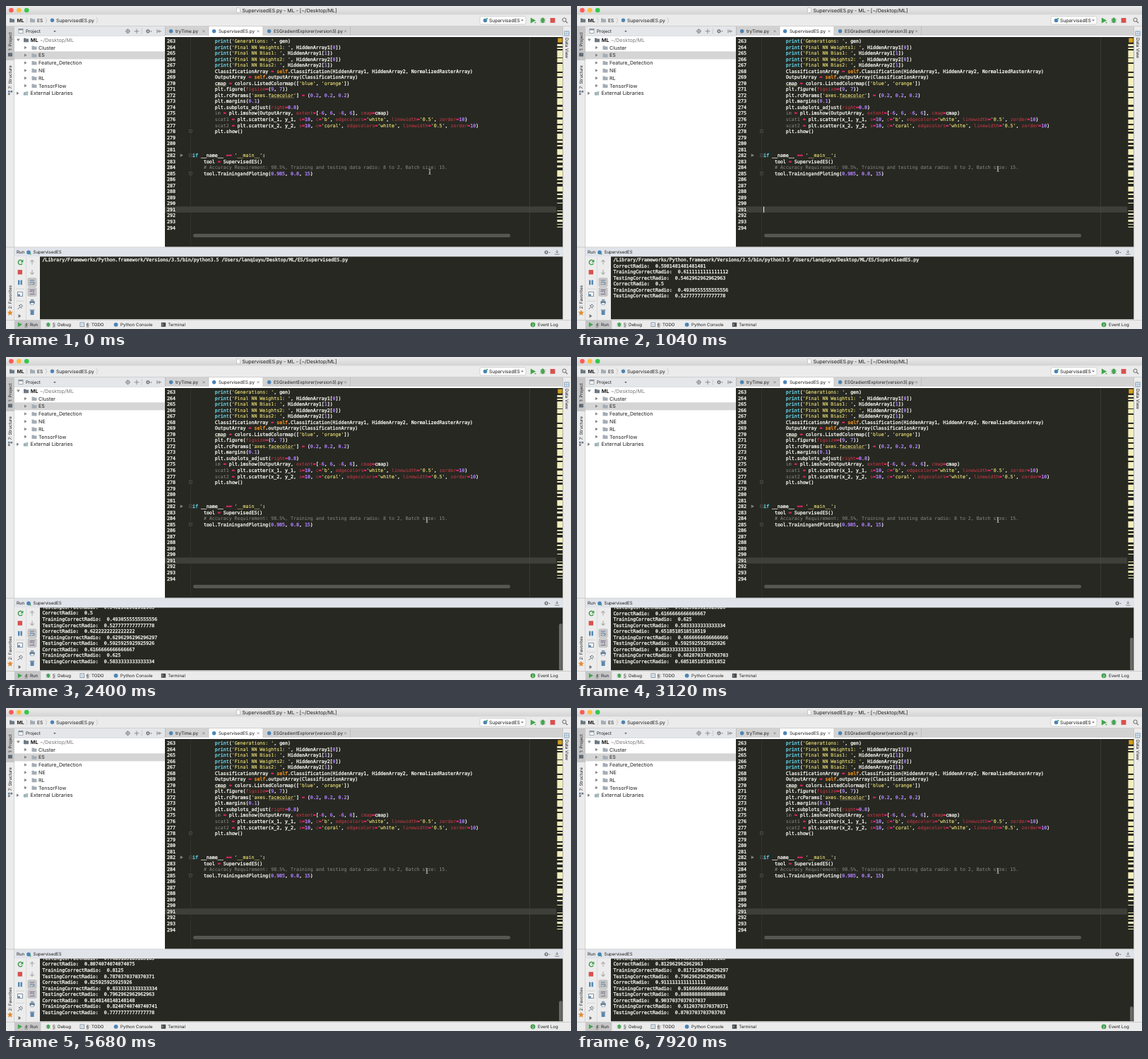
These frames come from a looping animation (800x458 px, 8000 ms). An HTML page:

```html
<!DOCTYPE html>
<html lang="en">
<head>
<meta charset="utf-8">
<title>Training run</title>
<style>
html, body { margin: 0; width: 100%; height: 100%; overflow: hidden; background: #ececec; }
svg { display: block; width: 100vw; height: 100vh; }
text { font-family: Inter, "Open Sans", sans-serif; fill: #1c1c1c; white-space: pre; text-rendering: geometricPrecision; }
.mono text { font-family: "DejaVu Sans Mono", "Liberation Mono", monospace; font-size: 6.606px; fill: #f8f8f2; stroke: #f8f8f2; stroke-width: .3; }
.mono .fn { fill: #66d9ef; stroke: #66d9ef; }
.mono .str { fill: #e6db74; stroke: #e6db74; stroke-width: .15; }
.mono .num { fill: #ae81ff; stroke: #ae81ff; }
.mono .arg { fill: #d23a48; stroke: none; }
.mono .op { fill: #f92672; stroke: #f92672; }
.mono .self { fill: #fd971f; stroke: #fd971f; }
.mono .dim { fill: #8c8c84; stroke: none; }
</style>
</head>
<body>
<svg id="stage" viewBox="0 0 800 458" preserveAspectRatio="none">
  <defs>
    <linearGradient id="bar" x2="0" y2="1"><stop stop-color="#ebebeb"/><stop offset="1" stop-color="#d3d3d3"/></linearGradient>
    <clipPath id="pane"><rect x="48" y="355.4" width="740" height="88.6"/></clipPath>
  </defs>
</svg>
<script>
const NS = 'http://www.w3.org/2000/svg';
const stage = document.getElementById('stage');
let layer = stage;

function el(tag, attrs, parent = layer) {
  const node = document.createElementNS(NS, tag);
  for (const k in attrs) node.setAttribute(k, attrs[k]);
  parent.appendChild(node);
  return node;
}
const rect = (x, y, width, height, fill, more) => el('rect', { x, y, width, height, fill, ...more });
const dot = (cx, cy, r, fill, more) => el('circle', { cx, cy, r, fill, ...more });
const fillPath = (d, fill) => el('path', { d, fill });
const line = (d, stroke, w = .6) => el('path', { d, stroke, fill: 'none', 'stroke-width': w });

// y is the vertical middle of the text
function label(x, y, s, size = 6.1, more = {}) {
  const t = el('text', { x, y: y + size * .36, 'font-size': size, ...more });
  t.textContent = s;
  return t;
}
function sideLabel(x, y, angle, s) {
  label(0, 0, s, 6.1, { transform: `translate(${x} ${y}) rotate(${angle})` });
}
const group = attrs => el('g', attrs, stage);
const folder = (x, y, tint = '#a4adb5') =>
  fillPath(`M${x} ${y - 2.6}h2.8l.8 1h3.4v4.6h-7z`, tint);
const page = (x, y) => {
  const d = `M${x} ${y - 3.4}h3.6l1.6 1.6v5.2h-5.2z`;
  fillPath(d, '#fafafa');
  line(d, '#a0a0a0', .5);
};
const badge = (x, y, r = 2.7) => dot(x, y, r, '#4b84b4');
const play = (x, y, r, fill = '#3fa64b') => fillPath(`M${x - r * .8} ${y - r}L${x + r} ${y}L${x - r * .8} ${y + r}z`, fill);
const down = (x, y, r = 1.7) => fillPath(`M${x - r} ${y - r * .6}h${2 * r}l${-r} ${r * 1.3}z`, '#5c5c5c');
const chevron = (x, y) => line(`M${x - 1} ${y - 4}l1.8 4l-1.8 4`, '#b4b4b4');
const cross = (x, y) => line(`M${x - 1.5} ${y - 1.5}l3 3m0 -3l-3 3`, '#777', .7);
function gear(x, y) {
  dot(x, y, 1.7, 'none', { stroke: '#666', 'stroke-width': 1.1 });
  dot(x, y, 2.6, 'none', { stroke: '#666', 'stroke-width': .8, 'stroke-dasharray': '1 1.04' });
  down(x + 4.6, y + .4, 1);
}
function bug(x, y, r) {
  line(`M${x - r} ${y - r * .6}l${2 * r} ${r * 1.4}m0 ${-r * 1.4}l${-2 * r} ${r * 1.4}M${x - r} ${y}h${2 * r}`, '#4d7d50', .6);
  el('ellipse', { cx: x, cy: y, rx: r * .65, ry: r, fill: '#46a552' });
}

function drawHeader() {
  rect(0, 0, 800, 458, '#ececec');
  rect(0, 0, 800, 12.5, 'url(#bar)');
  ['#fc5b57', '#fdbc40', '#34c84a'].forEach((c, i) => dot(7.4 + i * 10.9, 6, 3.3, c));
  page(326.4, 6);
  label(334.5, 6.2, 'SupervisedES.py - ML - [~/Desktop/ML]', 7.05);

  rect(0, 12.5, 800, 16.5, '#ebebeb');
  rect(0, 28.4, 800, .7, '#bdbdbd');
  folder(5, 20.2, '#6e7a84');
  label(15.5, 20.3, 'ML', 6.8, { 'font-weight': 700 });
  chevron(29.5, 20.3);
  folder(34, 20.2);
  label(44, 20.3, 'ES', 6.7);
  chevron(57, 20.3);
  badge(65.5, 20.3);
  label(71, 20.3, 'SupervisedES.py', 6.7);
  chevron(129, 20.3);

  rect(671, 14.6, 65, 11.4, '#fcfcfc', { rx: 2, stroke: '#bcbcbc', 'stroke-width': .6 });
  badge(678.5, 20.5, 2.8);
  dot(681.2, 17.8, 1.1, '#4bb04f');
  label(684, 20.4, 'SupervisedES', 6.65);
  down(731, 20.4);
  play(746, 20.4, 4);
  dot(749.4, 23.5, 1.1, '#58bb5c');
  bug(760, 20.4, 3.8);
  rect(770.6, 17, 6.8, 6.8, '#d9504e');
  dot(790.5, 19.6, 2.6, 'none', { stroke: '#666', 'stroke-width': 1 });
  line('M792.4 21.6l2.6 2.6', '#666', 1.2);
}

function drawProject() {
  rect(0, 29, 11.6, 417, '#ebebeb');
  rect(0, 29, 11.6, 48, '#c6c6c6');
  rect(11.3, 29, .6, 417, '#c0c0c0');
  sideLabel(5.7, 63.5, -90, '1: Project');
  rect(3, 66.5, 6, 5, '#5f6468');
  rect(6.2, 67.6, 2, 2, '#4b84b4');
  sideLabel(5.7, 117.5, -90, '7: Structure');
  [[3, 120, '#5a87b0'], [6.5, 120, '#777'], [3, 123.5, '#777']].forEach(([x, y, c]) => rect(x, y, 2.6, 2.6, c));
  sideLabel(5.7, 429.5, -90, '2: Favorites');
  fillPath('M5.8 430.8l1.2 2.7 2.9.3-2.2 2 .7 2.9-2.6-1.5-2.6 1.5.7-2.9-2.2-2 2.9-.3z', '#e28b32');

  rect(12, 29, 213, 13.6, '#e4e6e9');
  rect(12, 42, 213, .7, '#c2c5ca');
  rect(18, 32.6, 6, 6, '#fff', { stroke: '#808890', 'stroke-width': .7 });
  rect(18, 32.6, 6, 1.8, '#7c8c9b');
  label(28, 35.8, 'Project', 6.25);
  down(69, 36);
  dot(172.5, 35.8, 2.6, 'none', { stroke: '#666', 'stroke-width': .7 });
  line('M172.5 32.4v6.8m-3.4 -3.4h6.8', '#666', .6);
  line('M185 32.5v6.6m-3.3 -3.3h6.6', '#777', .8);
  line('M192.3 31.5v8.5', '#bbb');
  gear(201, 35.8);
  line('M214 33.2v5.2m1.5 -2.6h4.5m-2.4 -1.8l-1.9 1.8l1.9 1.8', '#666', .8);

  rect(12, 42.7, 213, 300, '#fff');
  rect(12, 64.4, 213, 11, '#d5d5d5');
  const arrow = (x, y) => fillPath(`M${x} ${y - 2.2}l3.6 2.2l-3.6 2.2z`, '#858585');
  fillPath('M15 46.4h4.8l-2.4 3.6z', '#858585');
  folder(25, 48.2, '#6e7a84');
  label(34.7, 48.2, 'ML', 7.2, { 'font-weight': 700 });
  label(48, 48.2, '~/Desktop/ML', 7.1, { style: 'fill:#777' });
  ['Cluster', 'ES', 'Feature_Detection', 'NE', 'RL', 'TensorFlow'].forEach((name, i) => {
    const y = 59 + i * 10.8;
    arrow(26, y);
    folder(36.5, y);
    label(46, y, name, 7.15);
  });
  arrow(15, 123.8);
  ['#7fa0ba', '#8fa79b', '#9aa9b5'].forEach((c, i) => rect(25 + i * 2.2, 122.2 - i * .6, 1.7, 4.4 + i * .6, c));
  label(34.5, 123.8, 'External Libraries', 7.3);
}

function drawTabs() {
  rect(225, 29, 564, 13.7, '#d2d2d2');
  rect(225, 29, .7, 13.7, '#b5b5b5');
  rect(287, 29, 77, 13.7, '#fff');
  [[226, 'tryTime.py', 280], [287, 'SupervisedES.py', 357], [365, 'ESGradientExplorer(version3).py', 480.5]].forEach(([x, name, end]) => {
    badge(x + 7.6, 35.8, 2.7);
    label(x + 14, 35.8, name, 6.35);
    cross(end, 35.8);
    rect(end + 6.6, 29, .6, 13.7, '#b2b2b2');
  });
  rect(225, 42, 563.5, 2, '#fff');
  rect(789, 29, 11, 417, '#ebebeb');
  rect(788.4, 29, .6, 417, '#c0c0c0');
  rect(791, 36, 6, 6, '#fff', { stroke: '#5883a8', 'stroke-width': .8 });
  line('M791 39h6m-3 -3v6', '#5883a8', .6);
  sideLabel(794.2, 45, 90, 'Data View');
}

const CHAR = 3.977, ROW = 8.53;
const rowY = n => 49.75 + (n - 263) * ROW;
const scatter = (n, color) =>
  `scat${n} = plt.scatter(x_${n}, y_${n}, s=10, c='${color}', edgecolors='white', linewidth='0.5', zorder=10)`;
const final = (n, part, cell) => `print('Final NN ${part}: ', HiddenArray${n}[${cell}])`;
const body = [
  "print('Generations: ', gen)",
  final(1, 'Weights1', 0), final(1, 'Bias1', 1), final(2, 'Weights2', 0), final(2, 'Bias2', 1),
  'ClassificationArray = self.Classification(HiddenArray1, HiddenArray2, NormalizedRasterArray)',
  'OutputArray = self.outputArray(ClassificationArray)',
  "cmap = colors.ListedColormap(['blue', 'orange'])",
  'plt.figure(figsize=(9, 7))',
  "plt.rcParams['axes.facecolor'] = (0.2, 0.2, 0.2)",
  'plt.margins(0.1)',
  'plt.subplots_adjust(right=0.8)',
  'im = plt.imshow(OutputArray, extent=[-6, 6, -6, 6], cmap=cmap)',
  scatter(1, 'b'), scatter(2, 'coral'),
  'plt.show()'
];
const tail = [
  "if __name__ == '__main__':",
  '    tool = SupervisedES()',
  '    # Accuracy Requirement: 98.5%, Training and testing data radio: 8 to 2, Batch size: 15.',
  '    tool.TrainingandPloting(0.985, 0.8, 15)'
];
const TOKEN = /(?<dim>#.*|^(?:im|scat\d)\b)|(?<str>'[^']*')|(?<fn>\bprint\b|^if\b)|(?<self>\bself\b)|(?<arg>\b\w+(?==))|(?<op>==?|-)|(?<num>\b\d+(?:\.\d+)?\b)/g;

function codeLine(n, src, indent) {
  const t = el('text', { x: 264 + indent * CHAR, y: rowY(n) + 2.35 });
  const add = (s, cls) => { if (s) el('tspan', cls ? { class: cls } : {}, t).textContent = s; };
  let at = 0;
  for (const m of src.matchAll(TOKEN)) {
    add(src.slice(at, m.index));
    add(m[0], Object.keys(m.groups).find(k => m.groups[k]));
    at = m.index + m[0].length;
  }
  add(src.slice(at));
}

let caret, mouse;
function drawEditor() {
  rect(225, 44, 563.2, 297.6, '#272822');
  rect(225, rowY(291) - 4.3, 554, 8.6, '#3f3f3a');
  rect(741, 44, .6, 297.6, '#45463f');
  rect(261, 44, .5, 297.6, '#3d3e37');
  rect(265, 323, 449, 5, '#555651', { rx: 2.5 });

  layer = group({ class: 'mono' });
  for (let n = 263; n <= 294; n++) el('text', { x: 228, y: rowY(n) + 2.35 }).textContent = n;
  body.forEach((s, i) => codeLine(263 + i, s, 8));
  tail.forEach((s, i) => {
    const src = s.trimStart();
    codeLine(282 + i, src, s.length - src.length);
  });
  layer = stage;
  line(`M295.8 ${rowY(270) + 3.6}h16M372 ${rowY(272) + 3.6}h36`, '#b9b27c', .5);
  play(248.6, rowY(282), 2.3, '#85867f');
  [278, 282, 285].forEach(n => {
    rect(259.2, rowY(n) - 2, 4, 4, '#272822', { stroke: '#66675f', 'stroke-width': .5 });
    line(`M260 ${rowY(n)}h2.4`, '#66675f', .5);
  });

  rect(781.3, 45.5, 6.2, 6.2, '#d4a020');
  // start and height of the warning marks beside the code
  const marks = [54, 3, 59, 2, 63, 10, 74, 6, 82, 11, 95, 5, 102, 12, 116, 5, 123, 6, 131, 9, 143, 4, 149, 9, 161, 6,
    169, 5, 176, 2, 181, 8, 191, 3, 197, 2, 203, 8, 214, 2, 219, 3, 226, 3, 233, 9, 245, 2, 250, 2, 256, 7,
    266, 2, 272, 2, 279, 1, 290, 1, 294, 2, 299, 1, 303, 3, 309, 1, 313, 1];
  for (let i = 0; i < marks.length; i += 2) rect(780.4, marks[i], 7.6, marks[i + 1], '#f3eebc');

  caret = rect(264, rowY(291) - 4.2, 1, 8.4, '#f8f8f0');
  mouse = line('M-1.5 -3.4q1.5 0 1.5 1q0 -1 1.5 -1M0 -2.4v5M-1.5 3.6q1.5 0 1.5 -1q0 1 1.5 1M-.9 1h1.8', '#e8e8e4', .7);
}

function drawRunTools() {
  rect(11.9, 342.4, 777, 13, '#e0e4ea');
  rect(0, 341.6, 789, .8, '#c4c4c4');
  label(15, 349.2, 'Run', 6.1);
  badge(32, 349.2, 2.8);
  dot(34.4, 351.6, 1.1, '#4bb04f');
  label(38.5, 349.2, 'SupervisedES', 6.1);
  gear(765, 349.2);
  line('M777 352h6.4M780.2 346v4m-1.8 -1.8l1.8 1.8l1.8 -1.8', '#666', .8);

  rect(11.9, 355.4, 36, 90, '#ececec');
  rect(28.4, 356, .6, 89.5, '#cdcdcd');
  line('M23 361.5a3.2 3.2 0 1 0 .2 3.6', '#3f9d49', 1.4);
  fillPath('M24.4 359.4v4h-4z', '#3f9d49');
  rect(16.6, 374.2, 6.4, 6.4, '#d9504e');
  [17, 20.6].forEach(x => rect(x, 388.7, 2.3, 6.6, '#4b84b4'));
  line('M14 401.2h12', '#c4c4c4');
  rect(16.4, 405.6, 7, 6, '#fff', { stroke: '#66788a', 'stroke-width': .8 });
  rect(16.4, 408.4, 3.6, 3.2, '#6d92b4');
  line('M14 418.4h12', '#c4c4c4');
  line('M16.6 430l3 -3m-1.7 -2.7l4.4 4.4m-3.4 -3.4l2.2 -2.3l2.4 2.4l-2.3 2.2', '#5d6b78', 1);
  label(16.6, 439.2, '»', 8);

  line('M37 366.6v-6.4m-2.6 2.6l2.6 -2.6l2.6 2.6', '#a9a9a9', 1.1);
  line('M37 374v6.4m-2.6 -2.6l2.6 2.6l2.6 -2.6', '#a9a9a9', 1.1);
  [391.8, 405.4].forEach(y => rect(31, y - 6, 12, 12, '#c9c9c9', { rx: 1.5, stroke: '#a2a2a2', 'stroke-width': .5 }));
  line('M33.6 389h6.6M33.6 391.8h6q1.4 1.4 0 2.8h-2.4M33.6 394.6h2', '#4e6d8c', .9);
  line('M33.6 402.6h7M33.6 404.8h4M33.6 408.6h7M39 404v3', '#6a5a7c', .9);
  rect(33.6, 418.4, 7, 3.6, '#56758f');
  rect(35, 415.8, 4.2, 2.4, '#8aa0b3');
  rect(35, 420.8, 4.2, 3, '#fff', { stroke: '#56758f', 'stroke-width': .5 });
  rect(34.6, 432, 5, 6, '#5c86ac');
  rect(33.8, 430.6, 6.6, 1, '#4b6f90');
}

function drawStatus() {
  rect(0, 445.4, 800, 12.6, '#ebebeb');
  rect(0, 445.2, 800, .6, '#b8b8b8');
  rect(11.9, 446, 37.5, 12, '#c6c6c6');
  const y = 451.8;
  const hot = (x, s) => {
    label(x, y, s);
    line(`M${x} ${y + 3.2}h3.6`, '#1c1c1c', .5);
  };
  play(19.6, y, 3.4);
  hot(26.6, '4: Run');
  bug(59.8, y, 3.1);
  hot(66, '5: Debug');
  rect(105, 449, 5.6, 5.6, '#fff', { stroke: '#6f8497', 'stroke-width': .8 });
  line('M106.2 451h3.2m-3.2 1.8h3.2', '#6f8497');
  hot(113.8, '6: TODO');
  badge(155.6, y, 2.9);
  label(162, y, 'Python Console');
  rect(219.8, 448.8, 6.4, 6, '#474b4f');
  line('M221 450.4l1.4 1.3l-1.4 1.3', '#fff', .6);
  label(229.2, y, 'Terminal');
  dot(746, y, 3.4, '#3f9d49');
  label(744.5, y, '2', 5, { style: 'fill:#fff' });
  label(753, y, 'Event Log');
}

// start time in ms, hits of 432 training samples, hits of 108 test samples
const runs = [
  [400, 264, 59], [880, 213, 57], [1440, 272, 64], [1920, 270, 63], [2480, 288, 64], [3040, 295, 74], [3680, 310, 83],
  [4240, 351, 85], [4800, 360, 86], [5360, 356, 84], [5920, 352, 83], [6480, 353, 86], [7040, 396, 96], [7600, 394, 94]
];
const VIEW = 89, STEP = 8.55;
let log, thumb;
const rows = [];
function drawConsole() {
  rect(48, 355.4, 740.2, 88.8, '#272822');
  const clip = group({ 'clip-path': 'url(#pane)', class: 'mono' });
  log = el('g', {}, clip);
  const lines = ['/Library/Frameworks/Python.framework/Versions/3.5/bin/python3.5 /Users/lanqiuyu/Desktop/ML/ES/SupervisedES.py'];
  for (const [, train, test] of runs) {
    lines.push(`CorrectRadio:  ${(train + test) / 540}`,
      `TrainingCorrectRadio:  ${train / 432}`,
      `TestingCorrectRadio:  ${test / 108}`);
  }
  lines.forEach((s, i) => {
    const t = el('text', { x: 51.4, y: 362 + i * STEP }, log);
    t.textContent = s;
    rows.push(t);
  });
  thumb = rect(783, 356, 4.6, VIEW, '#686964', { rx: 2.3 });
}

function show(t) {
  const count = 1 + 3 * runs.filter(r => r[0] <= t).length;
  rows.forEach((r, i) => r.setAttribute('visibility', i < count ? 'visible' : 'hidden'));
  const total = (count + 1) * STEP;
  const scroll = Math.max(0, total - VIEW);
  log.setAttribute('transform', `translate(0 ${-scroll})`);
  const h = VIEW * VIEW / Math.max(total, VIEW);
  thumb.setAttribute('y', 444.2 - h);
  thumb.setAttribute('height', h);
  thumb.setAttribute('visibility', scroll ? 'visible' : 'hidden');

  caret.setAttribute('visibility', t >= 880 && t < 1360 ? 'visible' : 'hidden');
  const p = Math.min(1, Math.max(0, (t - 80) / 400));
  const slide = 4 * p * p * (3 - 2 * p);
  mouse.setAttribute('transform', `translate(${600 - slide} ${235 - slide})`);
}

drawHeader();
drawProject();
drawTabs();
drawEditor();
drawRunTools();
drawStatus();
drawConsole();

const begin = performance.now();
function tick() {
  show(Math.floor((performance.now() - begin) % 8000 / 80) * 80);
  requestAnimationFrame(tick);
}
show(0);
tick();
</script>
</body>
</html>
```
